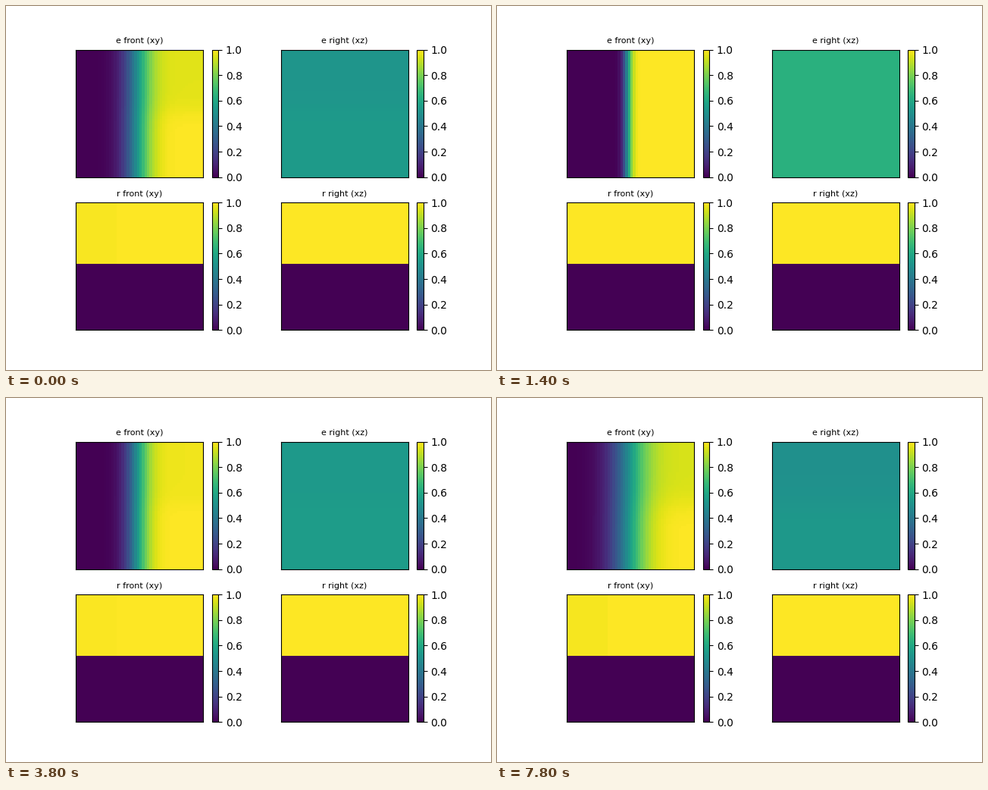
Write a matplotlib script that moves like this. It is 640x480 px and loops after 8000 ms.

```python
import math

import matplotlib.pyplot as plt
import numpy as np
from matplotlib.animation import FuncAnimation

N = 50            # cells per side
FRAMES = 40
STEP_MS = 200
RESET = 6         # frame on which the run starts afresh
EDGE = 23.85      # column of the diffusing front
WALL = 24         # rows filled with r

cells = np.arange(N) + 0.5
erf = np.vectorize(math.erf)


def phi(x):
    return 0.5 * (1 + erf(x / math.sqrt(2)))


def state(n):
    """Variance of the front and loss in the upper half."""
    if n < RESET:
        return 31 + 1.5 * n, 0.043 + 0.0018 * n
    age = n - RESET
    return 1.9 + 1.6 * age, 0.0018 * age


def fields(n):
    var, loss = state(n)
    s = math.sqrt(var)
    keep = 1 - loss * phi((WALL - cells) / (0.7 * s))
    e_front = np.outer(keep, phi((cells - EDGE) / s))
    if n == RESET:
        e_right = np.ones((N, N))
    else:
        e_right = np.outer(keep, np.full(N, e_front[-1, WALL]))

    r_front = np.zeros((N, N))
    r_front[:WALL] = 1
    r_right = r_front.copy()
    if loss > 0.02:
        r_front[:WALL, :16] = 1 - 0.25 * loss
    return e_front, e_right, r_front, r_right


fig, axes = plt.subplots(2, 2, figsize=(6.4, 4.8), dpi=100)
titles = ["e front (xy)", "e right (xz)", "r front (xy)", "r right (xz)"]
images = []
for ax, title, data in zip(axes.flat, titles, fields(0)):
    im = ax.imshow(data, vmin=0, vmax=1, cmap="viridis", interpolation="nearest")
    ax.set_title(title, fontsize=8)
    ax.set_xticks([])
    ax.set_yticks([])
    fig.colorbar(im, ax=ax)
    images.append(im)


def update(n):
    for im, data in zip(images, fields(n)):
        im.set_data(data)
    return images


anim = FuncAnimation(fig, update, frames=FRAMES, interval=STEP_MS,
                     init_func=lambda: update(0), repeat=True, repeat_delay=0)
plt.show()
```
